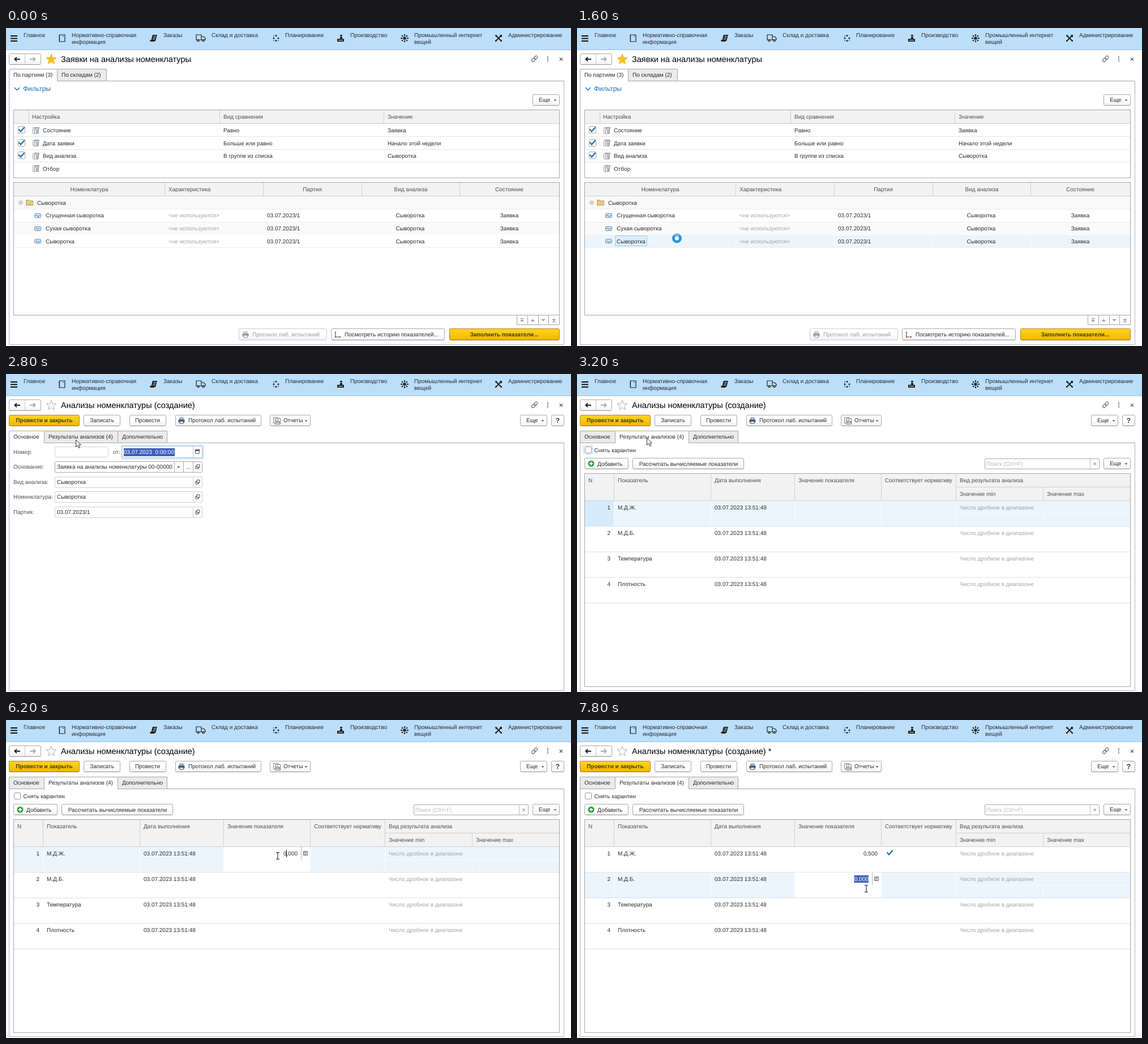
Write an HTML page with a canvas that moves like this. It is 998 px wide and 561 px high and loops after 8 s.

```html
<!DOCTYPE html>
<html lang="ru">
<head>
<meta charset="utf-8">
<title>Анализы номенклатуры</title>
<style>
html, body { margin: 0; width: 100%; height: 100%; overflow: hidden; background: #fff; }
canvas { display: block; width: 998px; height: 561px; }
</style>
</head>
<body>
<canvas id="stage"></canvas>
<script>
const W = 998, H = 561, LOOP = 8000, STEP = 200;
const canvas = document.getElementById('stage');
const dpr = window.devicePixelRatio || 1;
canvas.width = W * dpr;
canvas.height = H * dpr;
const ctx = canvas.getContext('2d');
ctx.scale(dpr, dpr);
ctx.textRendering = 'geometricPrecision';

const INK = '#2b2b2b', SOFT = '#505050', DIM = '#a3a3a3', EDGE = '#a6a6a6', LINE = '#e4e4e4';
const HEAD = '#f2f2f2', ROW = '#ebf5fe', CELL = '#d6ebfc', BLUE = '#1c6fb8', MARK = '#3f5fbd';

// Basic drawing
function box(x, y, w, h, color) {
  ctx.fillStyle = color;
  ctx.fillRect(x, y, w, h);
}
const hline = (x0, x1, y, color) => box(x0, y, x1 - x0, 1, color);
const vline = (x, y0, y1, color) => box(x, y0, 1, y1 - y0, color);

function frame(x0, y0, x1, y1, stroke, fill, r = 0) {
  ctx.beginPath();
  ctx.roundRect(x0 + .5, y0 + .5, x1 - x0 - 1, y1 - y0 - 1, r);
  if (fill) { ctx.fillStyle = fill; ctx.fill(); }
  ctx.strokeStyle = stroke;
  ctx.lineWidth = 1;
  ctx.stroke();
}

function shape(d, x, y, fill, stroke, width = 1) {
  const p = new Path2D(d);
  ctx.save();
  ctx.translate(x, y);
  if (fill) { ctx.fillStyle = fill; ctx.fill(p); }
  if (stroke) { ctx.strokeStyle = stroke; ctx.lineWidth = width; ctx.stroke(p); }
  ctx.restore();
}

function disc(x, y, r, color) {
  ctx.beginPath();
  ctx.arc(x, y, r, 0, Math.PI * 2);
  ctx.fillStyle = color;
  ctx.fill();
}

// y is the middle of the capital letters
function text(s, x, y, { color = INK, size = 10, bold = false, align = 'left' } = {}) {
  ctx.font = `${bold ? 'bold ' : ''}${size}px "Liberation Sans", Arial, sans-serif`;
  ctx.textAlign = align;
  ctx.fillStyle = color;
  ctx.fillText(s, x, y + size * .34);
}
const center = (s, x, y, opt) => text(s, x, y, { ...opt, align: 'center' });

// Controls
function button(x0, y0, x1, y1, { main = false, off = false } = {}) {
  const g = ctx.createLinearGradient(0, y0, 0, y1);
  g.addColorStop(0, main ? '#ffd42a' : '#fff');
  g.addColorStop(.5, main ? '#fac60c' : '#fff');
  g.addColorStop(1, main ? '#f0b400' : '#efefef');
  frame(x0, y0, x1, y1, main ? '#ad8a14' : off ? '#cbcbcb' : '#a9a9a9', g, 2);
  if (!off) hline(x0 + 2, x1 - 2, y1 - 1, main ? '#957208' : '#939393');
}
const caret = (x, y) => shape('M-2.5-1h5L0 1.6z', x, y, '#444');

function more(x, y) {
  button(x, y, x + 48, y + 20);
  text('Еще', x + 11, y + 10);
  caret(x + 40, y + 10.5);
}

function tabs(list, y0, y1, active) {
  hline(5, 986, y1 - 1, EDGE);
  list.forEach(([s, x0, x1], i) => {
    const on = i === active;
    frame(x0, y0, x1 + 1, y1, EDGE, on ? '#fff' : '#ebebeb', on ? 1 : 0);
    if (on) box(x0 + 1, y1 - 2, x1 - x0 - 1, 3, '#fff');
    text(s, x0 + 8, (y0 + y1) / 2 - .4);
  });
}

function panel(y) {
  frame(5, y, 986, 559, '#b3b3b3', '#fff');
}

const tick = (x, y) => shape('M-5-1L-1.5 3L5-4.5', x, y, null, BLUE, 2.2);

function printer(x, y, body, paper) {
  shape('M-3-5h6v3h-6z', x, y, paper, body);
  shape('M-5.5-2h11v5h-11z', x, y, body);
  shape('M-3 1h6v4h-6z', x, y, '#fff', body);
}

function openIcon(x, y) {
  shape('M-1.5-3.5h5v4.5h-5zM-1.5-1h-2v4.5h5v-2', x, y, null, '#444');
}

function calcIcon(x, y) {
  frame(x - 4, y - 4, x + 4, y + 4, '#777', '#ddd');
  hline(x - 2, x + 2, y - 2, '#666');
  for (const dy of [0, 2]) for (const dx of [-2, 0]) box(x + dx, y + dy, 1, 1, '#777');
}

// Shared top part
function menuBar() {
  box(0, 0, W, 39, '#bbdefb');
  hline(0, W, 38, '#a5c3dc');
  for (const y of [13, 17.5, 22]) box(8, y, 12, 2, '#111');
  const items = [['Главное', 31], ['Нормативно-справочная', 116, 'информация'], ['Заказы', 278],
    ['Склад и доставка', 363], ['Планирование', 493], ['Производство', 608],
    ['Промышленный интернет', 721, 'вещей'], ['Администрирование', 887]];
  for (const [a, x, b] of items) {
    text(a, x, 12.5);
    if (b) text(b, x, 25);
  }
  const k = '#222';
  shape('M-4.5-6h9.5v12h-9.5zM-6-4h2M-6-1h2M-6 2h2M-6 5h2M1-3.5h2', 99, 18, null, k, 1.2);
  shape('M-2-6L6-6L3 5L-5 5zM-7 3h8v3h-7z', 261, 18, k);
  shape('M0-3.5h4M-1-1h4M-2 1.5h4', 261, 18, null, '#bbdefb');
  shape('M-8-5h9v9h-9zM1-2h4l3 3v3h-7z', 344, 17, null, k, 1.2);
  for (const x of [339.5, 348.5]) {
    disc(x, 22, 2.3, k);
    disc(x, 22, .9, '#bbdefb');
  }
  for (const [x, y] of [[473, 18], [477, 13.5], [477, 22.5], [481, 18]]) disc(x, y, 1.5, k);
  shape('M-5-4h2M-5 4h2M3 4h2', 477, 18, null, k);
  shape('M-6 6v-5h5v-7h4v7h3v5z', 591, 18, k);
  shape('M-4 3.5h8M-1-3h4', 591, 18, null, '#bbdefb');
  disc(704, 18, 2.3, k);
  for (let i = 0; i < 8; i++) {
    const a = i * Math.PI / 4, c = Math.cos(a), s = Math.sin(a);
    shape(`M0 0L${c * 5.5} ${s * 5.5}`, 704, 18, null, k);
    disc(704 + c * 5.7, 18 + s * 5.7, 1.3, k);
  }
  shape('M-5-5L5 5M5-5L-5 5', 870, 18, null, k, 2);
  shape('M-6-6l4 1l-3 3zM2-6h4v4h-2zM3 6l3-3v3zM-6 6v-3l3 3z', 870, 18, k);
}

function titleBar(title, starred) {
  button(5, 45, 62, 65);
  vline(33, 46, 64, '#c8c8c8');
  const arrow = 'M5 0H-4M-1-3.5L-4.7 0L-1 3.5';
  shape(arrow, 20, 55, null, '#222', 1.8);
  ctx.save();
  ctx.translate(47, 55);
  ctx.scale(-1, 1);
  shape(arrow, 0, 0, null, '#aaa', 1.8);
  ctx.restore();

  let star = '';
  for (let i = 0; i < 10; i++) {
    const a = i * Math.PI / 5 - Math.PI / 2, r = i % 2 ? 3.9 : 9.2;
    star += `${i ? 'L' : 'M'}${Math.cos(a) * r} ${Math.sin(a) * r}`;
  }
  shape(star + 'z', 80, 55.5, starred ? '#fcc419' : '#fff', starred ? '#e5aa12' : '#b0b0b0');
  text(title, 97, 55, { size: 14.5, color: '#000' });

  ctx.save();
  ctx.translate(933.5, 54.5);
  ctx.rotate(-Math.PI / 4);
  for (const x of [-6, 0]) {
    ctx.beginPath();
    ctx.roundRect(x, -2.3, 6.5, 4.6, 2.3);
    ctx.strokeStyle = '#666';
    ctx.lineWidth = 1.1;
    ctx.stroke();
  }
  ctx.restore();
  for (const y of [51, 54.5, 58]) disc(957, y, 1, '#444');
  shape('M-2.5-2.5l5 5M2.5-2.5l-5 5', 980.5, 55, null, '#555', 1.1);
}

// List of requests
function filterIcon(x, y) {
  frame(x - 6, y - 6, x + 5, y + 6, '#a9adb1', '#eef0f2', 1);
  shape('M-2-5h8l-3 4v6l-2-1v-5z', x, y, '#d8dde1', '#81878d');
  vline(x - 3, y - 4, y + 5, '#999');
}

function filterTable() {
  frame(13, 144, 978, 265, EDGE, '#fff');
  box(14, 145, 963, 23, HEAD);
  hline(14, 977, 168, '#d0d0d0');
  for (const x of [40, 377, 667]) vline(x, 145, 168, '#d0d0d0');
  const cols = [65, 384, 674];
  ['Настройка', 'Вид сравнения', 'Значение'].forEach((s, i) => text(s, i ? cols[i] : 46, 156.5, { color: SOFT }));
  const rows = [['Состояние', 'Равно', 'Заявка'], ['Дата заявки', 'Больше или равно', 'Начало этой недели'],
    ['Вид анализа', 'В группе из списка', 'Сыворотка'], ['Отбор']];
  rows.forEach((row, i) => {
    const y = 180.5 + i * 22.6;
    row.forEach((s, c) => text(s, cols[c], y));
    filterIcon(53, Math.round(y));
    if (i < 3) {
      const b = Math.round(y - 7.5);
      frame(21, b, 34, b + 13, '#a5a5a5', '#fff', 1);
      tick(27.5, b + 6.5);
      hline(14, 977, Math.round(y + 10.5), LINE);
    }
  });
}

function itemTable(selected) {
  frame(13, 272, 978, 507, EDGE, '#fff');
  box(14, 273, 963, 23, HEAD);
  hline(14, 977, 296, '#d0d0d0');
  const seams = [280, 454, 628, 801];
  for (const x of seams) vline(x, 273, 296, '#d0d0d0');
  const soft = { color: SOFT };
  center('Номенклатура', 147, 284.5, soft);
  text('Характеристика', 287, 284.5, soft);
  center('Партия', 541, 284.5, soft);
  center('Вид анализа', 715, 284.5, soft);
  center('Состояние', 889, 284.5, soft);

  box(14, 297, 963, 22, '#f9f9f9');
  hline(14, 977, 319, '#ececec');
  ctx.beginPath();
  ctx.arc(26, 308, 3.2, 0, Math.PI * 2);
  ctx.strokeStyle = '#aaa';
  ctx.lineWidth = 1;
  ctx.stroke();
  hline(24, 28, 307.5, '#888');
  shape('M-6 4.5v-9h4l1.5 1.5h6v7.5z', 42, 308, '#f3c75f', '#b98d36');
  box(38, 307, 9, 4, '#fbeab8');
  shape('M-3 1l2-2l2 2l3-2', 42, 309, null, '#557aa0');
  text('Сыворотка', 55, 308.5);

  ['Сгущенная сыворотка', 'Сухая сыворотка', 'Сыворотка'].forEach((s, i) => {
    const y = 331 + i * 22.6, top = Math.round(y - 11);
    const on = selected && i === 2;
    box(14, top, 963, 22, on ? ROW : i === 1 ? '#fafafa' : '#fff');
    hline(14, 977, top + 22, '#ececec');
    if (on) {
      for (const x of seams) vline(x, top, top + 22, '#fafdff');
      frame(67, 366, 124, 385, '#a3caec', '#dcedfc');
    }
    frame(50, top + 7, 62, top + 15, '#5b8fbd', '#d7e9f8', 1);
    shape('M-4 1l2-2l3 3l3-3', 56, y, null, '#2a5f94');
    text(s, 70, y);
    text('<не используются>', 287, y, { color: DIM });
    text('03.07.2023/1', 461, y);
    center('Сыворотка', 714, y);
    center('Заявка', 889, y);
  });

  for (let i = 0; i < 4; i++) {
    const x = 902 + i * 18.8, up = i < 2;
    frame(Math.round(x), 506, Math.round(x + 19.8), 524, EDGE, '#fff');
    shape(up ? 'M-3.5 2h7L0-2z' : 'M-3.5-2h7L0 2z', x + 9.5, 515.5, '#999');
    if (i === 0) hline(x + 6, x + 13, 512, '#999');
    if (i === 3) hline(x + 6, x + 13, 518, '#999');
  }
}

function listPage(selected) {
  titleBar('Заявки на анализы номенклатуры', true);
  panel(93);
  tabs([['По партиям (3)', 5, 90], ['По складам (2)', 90, 177]], 72, 94, 0);
  shape('M-4.5-2L0 2.5L4.5-2', 19.5, 107, null, BLUE, 1.4);
  text('Фильтры', 30, 107, { size: 12, color: BLUE });
  more(930, 117);
  filterTable();
  for (let x = 14; x < 977; x += 4) box(x, 268, 2, 1, '#dedede');
  itemTable(selected);
  button(411, 530, 567, 551, { off: true });
  printer(423, 541, '#9a9a9a', '#eee');
  text('Протокол лаб. испытаний', 435, 541, { color: '#9a9a9a' });
  button(574, 530, 775, 551);
  shape('M-4-5v9h8', 586, 541, null, '#555', 1.2);
  for (const [x, y] of [[-4, -4], [-4, 4], [4, 4]]) box(585 + x, 540 + y, 2, 2, '#c0392b');
  text('Посмотреть историю показателей...', 598, 541);
  button(783, 530, 978, 551, { main: true });
  center('Заполнить показатели...', 880, 541, { bold: true, color: '#3d3a20' });
}

// Analysis form
function formTop(title, tab) {
  titleBar(title, false);
  button(5, 72, 130, 92, { main: true });
  center('Провести и закрыть', 67.5, 82, { bold: true, color: '#3d3a20' });
  button(137, 72, 202, 92);
  center('Записать', 169.5, 82);
  button(218, 72, 283, 92);
  center('Провести', 250, 82);
  button(299, 72, 451, 92);
  printer(310, 82.5, '#3f5f80', '#cfe0f0');
  text('Протокол лаб. испытаний', 322, 82);
  button(466, 72, 538, 92);
  frame(472, 76, 481, 87, '#888', '#fff');
  frame(475, 78, 485, 89, '#777', '#fff');
  [['#3a8f4d', 5], ['#888', 7], ['#3a8f4d', 4]].forEach(([c, h], i) => box(477 + i * 2.5, 87 - h, 1.5, h, c));
  text('Отчеты', 490, 82);
  caret(530, 82.5);
  more(908, 72);
  button(963, 72, 986, 92);
  center('?', 974.5, 82, { bold: true, size: 12 });
  panel(121);
  tabs([['Основное', 5, 67], ['Результаты анализов (4)', 67, 197], ['Дополнительно', 197, 284]], 100, 122, tab);
}

function mainTab() {
  const ys = [137.5, 164, 190.5, 217, 243.5];
  ['Номер:', 'Основание:', 'Вид анализа:', 'Номенклатура:', 'Партия:'].forEach((s, i) => text(s, 13, ys[i], { color: SOFT }));
  frame(86, 128, 181, 147, '#d0d0d0', '#fff', 2);
  text('от:', 189, 137.5, { color: SOFT });
  frame(203, 125, 349, 150, '#a9d3f5', '#e9f5fe', 1);
  frame(205, 127, 347, 148, '#a8c9e4', '#fff');
  box(208, 131, 90, 14, MARK);
  text('03.07.2023  0:00:00', 208, 138, { color: '#fff' });
  vline(330, 128, 147, '#c5c5c5');
  frame(334, 133, 342, 141, '#555', '#fff', 1);
  box(334, 133, 8, 3, '#555');
  for (const x of [336, 339]) box(x, 138, 1, 1, '#555');

  ['Заявка на анализы номенклатуры 00-000001', 'Сыворотка', 'Сыворотка', '03.07.2023/1'].forEach((s, i) => {
    const y = ys[i + 1], top = Math.round(y - 10);
    const c = i ? '#d0d0d0' : '#a8a8a8';
    frame(86, top, 347, top + 20, c, '#fff', 2);
    ctx.save();
    ctx.beginPath();
    ctx.rect(87, top, i ? 242 : 208, 20);
    ctx.clip();
    text(s, 90, y);
    ctx.restore();
    vline(330, top + 1, top + 19, c);
    openIcon(338.5, Math.round(y) - .5);
    if (i === 0) {
      vline(297, top + 1, top + 19, c);
      vline(313, top + 1, top + 19, c);
      caret(305, y);
      center('...', 322, y);
    }
  });
}

function resultsTab(t) {
  if (t < 4000) frame(11, 126, 28, 142, '#c3e0f7', '#f1f8fe', 1);
  frame(14, 128, 26, 140, '#999', '#fff', 1);
  text('Снять карантин', 30.5, 134.2);
  button(13, 148, 91, 168);
  disc(25, 158, 5.6, '#35a045');
  shape('M-3 0h6M0-3v6', 25, 158, null, '#fff', 1.8);
  text('Добавить', 36, 158.3);
  button(98, 148, 295, 168);
  center('Рассчитать вычисляемые показатели', 197, 158.3);
  frame(720, 149, 923, 168, '#a8a8a8', '#fff', 1);
  vline(906, 150, 167, '#c0c0c0');
  text('Поиск (Ctrl+F)', 723, 158.3, { color: '#bbb' });
  shape('M-2-2l4 4M2-2l-4 4', 914.5, 158.5, null, '#555');
  more(930, 148);

  frame(13, 175, 978, 552, EDGE, '#fff');
  box(14, 176, 963, 47, HEAD);
  const seams = [65, 236, 384, 537, 669];
  for (const x of seams) vline(x, 176, 223, '#d0d0d0');
  hline(669, 977, 199, '#d0d0d0');
  vline(823, 199, 223, '#d0d0d0');
  hline(14, 977, 223, '#d0d0d0');
  const soft = { color: SOFT };
  const heads = ['N', 'Показатель', 'Дата выполнения', 'Значение показателя', 'Соответствует нормативу', 'Вид результата анализа'];
  heads.forEach((s, i) => text(s, i ? seams[i - 1] + 7 : 20, 187.6, soft));
  text('Значение min', 676, 211.7, soft);
  text('Значение max', 830, 211.7, soft);
  if (t >= 3200) resultRows(t, seams);
}

const PITCH = 45.1;

function resultRows(t, seams) {
  const current = t < 7600 ? 0 : 1;
  const right = { align: 'right' };
  const mid = i => 235.7 + i * PITCH;
  ['М.Д.Ж.', 'М.Д.Б.', 'Температура', 'Плотность'].forEach((s, i) => {
    const top = Math.round(224 + i * PITCH), y = mid(i);
    if (i === current) {
      box(14, top, 963, 45, ROW);
      if (t < 4000) box(14, top, 51, 45, CELL);
      else if (t < 4200) box(385, top, 152, 45, CELL);
      for (const x of seams) vline(x, top, top + 45, '#fafdff');
      hline(669, 977, top + 22, '#fafdff');
      vline(823, top + 22, top + 45, '#fafdff');
    }
    hline(14, 977, 223.1 + (i + 1) * PITCH, '#dedede');
    text(String(i + 1), 59, y, right);
    text(s, 72, y);
    text('03.07.2023 13:51:48', 243, y);
    text('Число дробное в диапазоне', 676, y, { color: DIM });
  });

  if (t >= 7600) {
    text('0,500', 531, mid(0), right);
    tick(552.5, 234.5);
    editor(269);
    box(489.5, 274, 25.5, 13, MARK);
    text('0,000', 515, mid(1), { align: 'right', color: '#fff' });
  } else if (t >= 4200) {
    editor(224);
    text(t < 6800 ? '0,000' : '0,500', 515, mid(0), right);
    const x = t < 6200 ? 490 : t < 6400 ? 495 : t < 6800 ? 498 : 504;
    vline(x, 229, 242, '#111');
    if (t >= 7400) vline(489.5, 275, 287, '#d9a441');
  }
}

function editor(top) {
  box(385, top, 152, 44, '#fff');
  vline(521, top, top + 22, '#b5b5b5');
  calcIcon(529, top + 11);
}

// Pointer stops: time, x, y, kind
const pointer = [
  [800, 300, 440, 'arrow'], [1000, 240, 405, 'arrow'], [1200, 190, 378, 'arrow'], [1400, 176, 371, 'arrow'],
  [1600, 176, 371, 'busy'], [2000, 170, 345, 'arrow'], [2200, 155, 270, 'arrow'], [2400, 140, 170, 'arrow'],
  [2600, 126, 84, 'arrow'], [2800, 123, 116, 'arrow'], [3000, 123, 113, 'arrow'], [3600, 220, 160, 'arrow'],
  [3800, 400, 257, 'arrow'], [4000, 480, 240, 'beam'], [7000, 486, 250, 'beam'], [7200, 498, 266, 'beam'],
  [7400, 507.5, 277, 'beam'], [7600, 510, 290, 'beam'], [7800, 511, 298, 'beam']
];

function drawPointer(t) {
  const stop = pointer.findLast(p => p[0] <= t);
  if (!stop) return;
  const [, x, y, kind] = stop;
  if (kind === 'arrow') {
    shape('M0 0V12.5L3 9.8L5 14.5L7 13.6L5 9H9z', x + .5, y, '#fff', '#333');
  } else if (kind === 'beam') {
    shape('M-3-6h2.2L0-5L.8-6H3M0-5V5M-3 6h2.2L0 5L.8 6H3', x, y - .5, null, '#222', 1.1);
  } else {
    disc(x + .5, y, 8.5, '#2f93d8');
    ctx.beginPath();
    ctx.arc(x + .5, y, 6, -2.4, -.9);
    ctx.strokeStyle = '#69b8ea';
    ctx.lineWidth = 4;
    ctx.stroke();
    disc(x + .5, y, 3.6, '#fff');
  }
}

function draw(t) {
  box(0, 0, W, H, '#fff');
  menuBar();
  if (t < 1800) {
    listPage(t >= 1400);
  } else {
    const results = t >= 3000;
    formTop('Анализы номенклатуры (создание)' + (t >= 7600 ? ' *' : ''), results ? 1 : 0);
    if (results) resultsTab(t);
    else mainTab();
  }
  drawPointer(t);
}

const start = performance.now();
function play() {
  const t = (performance.now() - start) % LOOP;
  draw(Math.floor(t / STEP) * STEP);
  requestAnimationFrame(play);
}
play();
</script>
</body>
</html>
```
